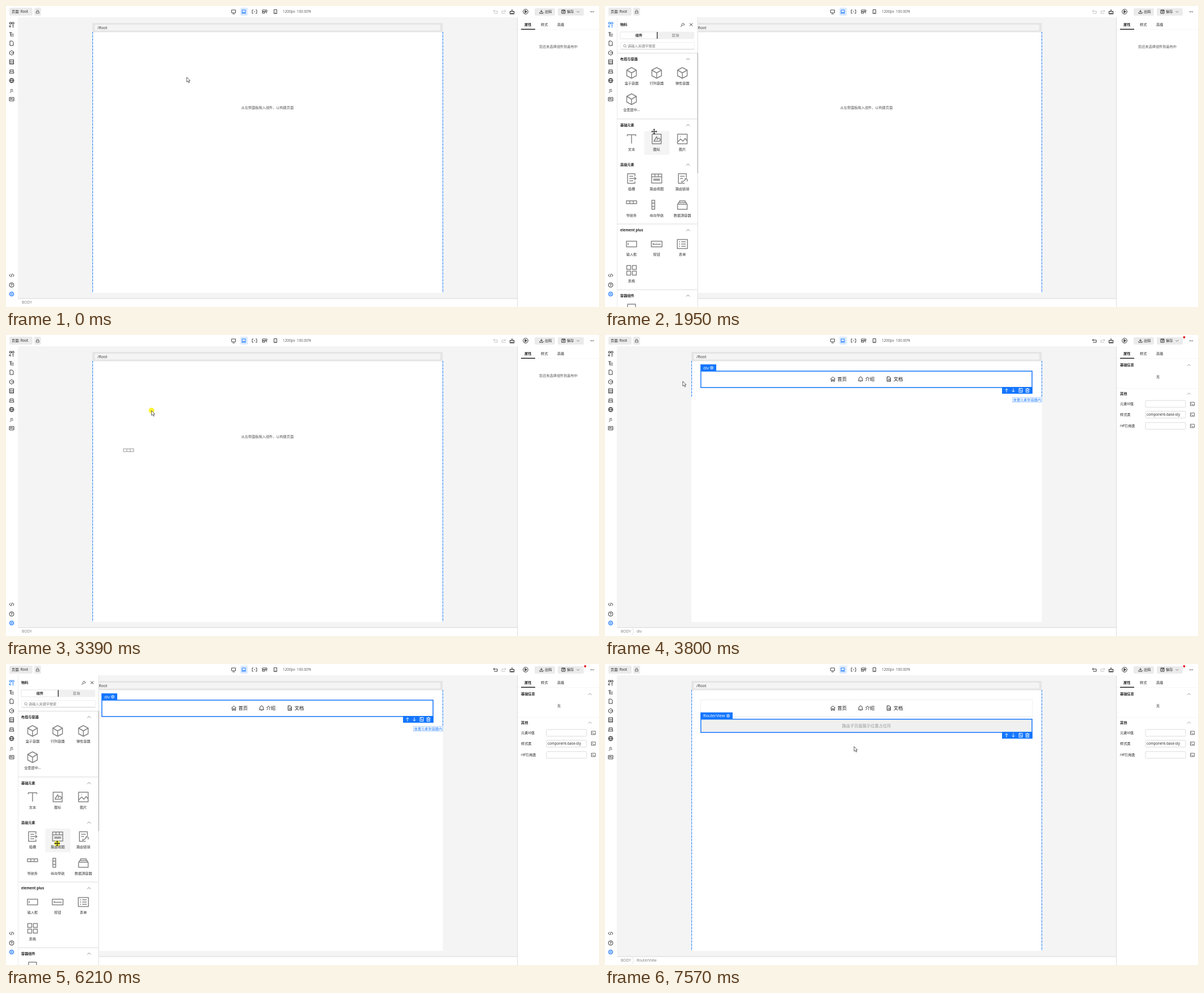
An HTML page that plays this animation: 1050x533 px, repeating every 8 s.

```html
<!DOCTYPE html>
<html lang="zh-CN">
<head>
<meta charset="utf-8">
<title>页面设计器</title>
<style>
  html, body { margin: 0; width: 100%; height: 100%; overflow: hidden; background: #fff; }
  svg { display: block; width: 100%; height: 100%; }
  text { font-family: 'Open Sans', 'Noto Sans CJK SC', 'Noto Sans CJK', sans-serif; white-space: pre; }
</style>
</head>
<body>
<svg id="stage" viewBox="0 0 1050 533"></svg>
<script>
const LOOP = 8000;
const BLUE = '#1476ff', INK = '#222', GREY = '#858585';

// Drawing helpers: each returns SVG markup
const rect = (x, y, w, h, fill, extra = '') =>
  `<rect x="${x}" y="${y}" width="${w}" height="${h}" fill="${fill}" ${extra}/>`;
const text = (x, cy, str, { size = 6.2, fill = INK, weight = 400, anchor = 'start' } = {}) =>
  `<text x="${x}" y="${cy + size * 0.36}" font-size="${size}" fill="${fill}" font-weight="${weight}" text-anchor="${anchor}">${str}</text>`;
const icon = (x, y, d, color = INK, width = 0.9) =>
  `<path transform="translate(${x} ${y})" d="${d}" fill="none" stroke="${color}" stroke-width="${width}" stroke-linejoin="round"/>`;
const group = (id, ...parts) => `<g id="${id}">${parts.join('')}</g>`;
const ring = r => `M${-r} 0a${r} ${r} 0 1 0 ${2 * r} 0a${r} ${r} 0 1 0 ${-2 * r} 0`;
const box = (x, y, w, h) => `M${x} ${y}h${w}v${h}h${-w}z`;

const chevronUp = 'M-3 1.5 0-1.5 3 1.5';
const gear = ring(2.6) + ring(1);

function header() {
  const devices = [
    [403, box(-3.5, -3, 7, 5) + 'M-2 4H2'],
    [421, box(-3, -3, 6, 4.5) + 'M-4 3H4'],
    [440, 'M-2-3H-4V3H-2M2-3H4V3H2M0-1V1'],
    [458, box(-4, -3, 8, 3) + box(-4, 0, 4, 3) + 'M1-2 4 3'],
    [477, box(-2.5, -3.5, 5, 7) + 'M-1 2H1'],
  ];
  return [
    rect(6, 3, 41, 14, '#ebebeb', 'rx="2"'), text(10, 10, '页面: Root'),
    rect(50, 3, 12, 14, '#ebebeb', 'rx="2"'), icon(56, 10, box(-2.5, 0, 5, 3) + 'M-1.5 0V-2L0-3 1.5-2V0', '#555', 0.8),
    rect(415, 3, 13, 14, '#dceaff', 'rx="2"'),
    ...devices.map(([x, d]) => icon(x, 10, d, x === 421 ? BLUE : '#333')),
    text(490, 10, '1200px', { size: 6.4, fill: '#555' }), text(515, 10, '100.00%', { size: 6.4, fill: '#555' }),
    group('undo', icon(867, 10, 'M-2-3-4-1-2 1M-4-1H3V3H-3')),
    icon(881, 10, 'M2-3 4-1 2 1M4-1H-3V3H3', '#bbb'),
    icon(896, 10, box(-3.5, -0.5, 7, 4.5) + 'M0-4V0M-1 2V4M1 2V4', INK, 1.1),
    icon(920, 10, ring(4.3)), icon(920, 10, 'M-1-2 2 0-1 2Z', INK, 1.2),
    rect(936, 4, 36, 13, '#ebebeb', 'rx="2"'), icon(948, 10, 'M0-3V1M-2-1 0 1 2-1M-3 1V3H3V1'), text(954, 10, '出码'),
    rect(977, 4, 46, 13, '#ebebeb', 'rx="2"'), icon(987, 10, box(-3, -3, 6, 6) + 'M-1-3V-1H2V-3M-1 1H1'), text(993, 10, '保存'),
    icon(1013, 10, 'M-2.5-1 0 1.5 2.5-1', '#666', 0.8),
    text(1038, 10, '···', { size: 8, weight: 700, anchor: 'middle' }),
  ].join('');
}

function sidebar() {
  const shapes = [
    [50, 'M-4-3H1M-2-3V3H4M-2 0H4'],
    [66, 'M-3-4H1L3-2V4H-3Z'],
    [83, 'M0-4 3.5-2V2L0 4-3.5 2V-2ZM-1 0H4'],
    [99, box(-3.5, -4, 7, 8) + 'M-3.5-1H3.5M-3.5 2H3.5'],
    [116, 'M-3-3H3V0H-3ZM-4 3H4M-3 0-4 3M3 0 4 3'],
    [132, ring(4) + 'M-4 0H4M0-4Q-4 0 0 4Q4 0 0-4'],
    [165, box(-4, -3, 8, 6) + 'M-2 1V-1H0V1M1-1 3 1'],
    [477, 'M-2-2.5-4 0-2 2.5M2-2.5 4 0 2 2.5M1-3-1 3'],
    [494, ring(4) + 'M-1.5-1Q0-3 1.5-1L0 .5V2'],
  ];
  return shapes.map(([y, d]) => icon(10, y, d)).join('') +
    `<g id="materials">${icon(10, 33, box(-3.5, -4, 3, 3) + box(1, -4, 3, 3) + 'M-1 2H-4V4H-1M1 1.5H4M1 4H4', 'currentColor')}</g>` +
    text(10, 149, 'JS', { size: 7, anchor: 'middle' }) +
    icon(10, 510, ring(3.4), '#4a94ff', 1.8) + icon(10, 510, ring(1), BLUE, 1);
}

function workspace() {
  return rect(21, 20, 884, 498, '#f4f4f4') + rect(153, 30, 620.5, 478, '#fff') +
    rect(153, 30, 620.5, 16.5, '#e5e5e5') + rect(157, 33, 612, 10.5, '#f4f4f4', 'rx="3"') +
    text(162, 38.5, '/Root', { size: 6.8, fill: '#333' }) +
    rect(21, 517.5, 884, 1.2, '#dedede') + rect(905, 20, 1, 513, '#dcdcdc') +
    text(28, 525, 'BODY', { fill: '#777', size: 6.6 });
}

const dashes = (id, bottom) =>
  `<path id="${id}" d="M153.5 46V${bottom}M773.5 46V${bottom}" stroke="${BLUE}" stroke-width="1.1" stroke-dasharray="3 1 1 1"/>`;

const crumb = (id, name) =>
  group(id, icon(50, 525, 'M-2-6 1 0-2 6', '#ddd'), text(56, 525, name, { fill: '#777', size: 6.6 }));

function selection(id, name, top, height, labelWidth, inner = '') {
  const bottom = top + height;
  return group(id, inner,
    `<rect x="169.7" y="${top}" width="586.4" height="${height}" fill="none" stroke="${BLUE}" stroke-width="1.5"/>`,
    rect(169, top - 12, labelWidth, 12, BLUE),
    text(174, top - 6, name, { size: 7.2, fill: '#fff' }), icon(169 + labelWidth - 8, top - 6, gear, '#fff', 0.8),
    rect(703, bottom - 1, 54, 12, BLUE),
    icon(711, bottom + 5, 'M0 3.5V-3M-2.5-.5 0-3 2.5-.5', '#fff'),
    icon(723, bottom + 5, 'M0-3.5V3M-2.5 .5 0 3 2.5 .5', '#fff'),
    icon(736, bottom + 5, box(-3, -3.5, 6, 7) + 'M-1-3V1H3', '#fff'),
    icon(748, bottom + 5, 'M-3.5-2.5H3.5M-1-3.5H1M-2.5-2.5V3.5H2.5V-2.5M-.8-1V2M.8-1V2', '#fff'));
}

function navBar() {
  const label = (x, str) => text(x, 78, str, { size: 8.2, fill: '#111' });
  return group('navBar',
    `<rect x="169.5" y="63.5" width="587.5" height="30" fill="#fff" stroke="#eee"/>`,
    icon(403.5, 78, 'M-4 0 0-4 4 0M-3-1V4H-1V1H1V4H3V-1'), label(411.5, '首页'),
    icon(452.5, 78, 'M-3 2V-1Q-2-4 0-4T3-1V2L4 3H-4ZM-1 4H1'), label(460.8, '介绍'),
    icon(502.5, 78, 'M-3-4H1L3-2V4H-3ZM-1 0H2M-1 2H2', INK, 1), label(511, '文档'));
}

function inspector() {
  const tabs = [[918, '属性', 600], [947, '样式', 400], [976, '高级', 400]];
  const fields = [[122, '元素id值', ''], [141, '样式类', 'component-base-sty'], [161, 'ref引用类', '']];
  return tabs.map(([x, s, weight]) => text(x, 33, s, { weight })).join('') +
    rect(906, 41.5, 144, 0.6, '#eee') + rect(912, 40.5, 25, 1.5, INK) +
    group('noSelection', text(978, 72, '您还未选择组件到画布中', { anchor: 'middle', fill: '#555' })) +
    group('properties',
      text(912, 53, '基础信息', { weight: 600 }), icon(1034, 53.5, chevronUp, '#888', 0.8),
      text(979, 74, '无', { anchor: 'middle' }),
      rect(906, 94, 144, 0.6, '#eee'),
      text(912, 104, '其他', { weight: 600 }), icon(1034, 104, chevronUp, '#888', 0.8),
      ...fields.map(([y, label, value]) => text(912, y, label) +
        rect(957, y - 6, 71, 12, '#fff', 'rx="1.5" stroke="#d2d2d2" stroke-width=".8"') + text(959, y, value) +
        icon(1040, y, box(-3.5, -3, 7, 6) + 'M-2-1.5-.5 0-2 1.5M0 1.5H2', '#444', 0.8)),
      `<circle cx="1025.5" cy="4" r="2" fill="#e02020"/>`);
}

const shape = {
  cube: 'M0-9.5 8.5-5V5L0 9.5-8.5 5V-5ZM-8.5-5 0 0 8.5-5M0 0V9.5',
  type: 'M-7.5-5V-7.5H7.5V-5M0-7.5V8',
  glyph: box(-8, -8.5, 16, 17) + 'M-5 4 0-4 2 0M-5 4H3M1 2a2.7 2.7 0 1 1 2 2',
  image: box(-8.5, -8.5, 17, 17) + 'M-8 5-3 0 1 4 5-1 8 3M-4-4h1',
  slot: 'M6-4V-8.5H-7V8.5H6V5M-4-4H3M-4 0H8M-4 4H3M5-2.5 8 0 5 2.5',
  view: box(-9, -8, 18, 16) + 'M-9-3H9M-3-8V-3M3-8V-3M-6 1H6M-6 3H6',
  link: 'M7-1V-8.5H-7V8.5H-1M-4-4H4M-4 0H1M1 6 6 1M0 4a2.5 2.5 0 1 0 4 4M4 1a2.5 2.5 0 1 1 4 4',
  nav: box(-9, -7, 18, 5) + 'M-3-7V-2M3-7V-2',
  column: box(-8.5, -8, 5, 16) + 'M-8.5-3H-3.5M-8.5 3H-3.5',
  trays: box(-8.5, -1, 17, 9) + 'M-7-1V-4H7V-1M-5-4V-7H5V-4',
  input: box(-9, -5, 18, 10) + 'M-6-2V2',
  button: box(-9.5, -5, 19, 10),
  form: box(-9, -8, 18, 16) + 'M-6-4H-4M-2-4H6M-6 0H-4M-2 0H6M-6 4H-4M-2 4H6',
  table: box(-8.5, -8.5, 7, 7) + box(1.5, -8.5, 7, 7) + box(-8.5, 1.5, 7, 7) + box(1.5, 1.5, 7, 7),
  tray: box(-7, -9.5, 14, 18),
};

const sections = [
  [94, '布局与容器', [['cube', '盒子容器'], ['cube', '行列容器'], ['cube', '弹性容器'], ['cube', '全宽居中...']]],
  [211, '基础元素', [['type', '文本'], ['glyph', '图标'], ['image', '图片']]],
  [281, '高级元素', [['slot', '插槽'], ['view', '路由视图'], ['link', '路由链接'],
    ['nav', '导航条'], ['column', '纵向导航'], ['trays', '数据源容器']]],
  [397, 'element plus', [['input', '输入框'], ['button', '按钮'], ['form', '表单'], ['table', '表格']]],
  [513, '容器组件', [['tray', '']]],
];
const items = sections.flatMap(([y, , list]) => list.map(([kind, label], i) =>
  ({ kind, label, x: [47, 91.5, 137][i % 3], y: y + 24.5 + 46.5 * Math.floor(i / 3) })));

function panel() {
  return group('panel',
    rect(21, 20, 144, 513, '#fff'), rect(21, 20, 0.8, 513, '#e6e6e6'),
    rect(163, 20, 2, 513, '#ededed'), rect(163.5, 83, 1.5, 213, '#c0c0c0'),
    text(27, 33, '物料', { weight: 600 }),
    icon(138, 33, 'M0-3 3 0 1 .5-.5 2-2.5 0-1-1.5ZM-1.5 1-4 4', '#333', 0.8),
    icon(152.5, 33, 'M-2.5-2.5 2.5 2.5M2.5-2.5-2.5 2.5'),
    rect(27, 45.5, 131, 13, '#f0f0f0', 'rx="1.5"'), rect(27, 46, 65, 12, '#fff', 'stroke="#ddd" stroke-width=".7"'),
    rect(91.8, 46, 1.4, 12, '#333'),
    text(60, 52, '组件', { anchor: 'middle', weight: 600 }), text(125, 52, '区块', { anchor: 'middle', fill: '#666' }),
    rect(27.5, 64.5, 131, 12, '#fff', 'rx="1.5" stroke="#eee" stroke-width=".8"'), rect(28, 76, 130, 1, '#d0d0d0'),
    icon(35, 70.5, ring(2.2) + 'M1.5 1.5 3 3', '#777', 0.7), text(40, 70.5, '请输入关键字搜索', { fill: '#777' }),
    ...[83, 199.5, 385.5, 502].map(y => rect(21, y, 142, 1, '#dcdcdc')),
    rect(-22, -14, 44.5, 42, '#f4f4f4', 'id="hover"'),
    ...sections.map(([y, title]) => text(27, y, title, { weight: 700 }) + icon(147, y, chevronUp, '#666', 0.8)),
    ...items.map(({ kind, label, x, y }) => icon(x, y, shape[kind], GREY, 1.5) +
      (kind === 'button' ? text(x, y, 'Button', { size: 4.2, weight: 700, fill: '#555', anchor: 'middle' }) : '') +
      text(x, y + 18.5, label, { anchor: 'middle', fill: '#333' })));
}

function cursor() {
  return group('cursor',
    `<circle id="press" r="5" fill="#fbf236"/>`,
    `<path id="arrow" d="M0 0V8.5L2 6.8 3.6 10 4.9 9.3 3.5 6.2H6Z" fill="#fff" stroke="#222" stroke-width=".7"/>`,
    `<path id="hand" d="M1 0Q2 0 2 1V4L6 5Q7 6 6 10H2L-1 6 1 6V1Z" fill="#fff" stroke="#111" stroke-width=".8"/>`,
    `<path id="move" d="M0-5 2-3H.6V-.6H3V-2L5 0 3 2V.6H.6V3H2L0 5-2 3H-.6V.6H-3V2L-5 0-3-2V-.6H-.6V-3H-2Z" fill="#222"/>`,
    `<g id="forbidden">${icon(0, 0, ring(3.6) + 'M-2.5-2.5 2.5 2.5', '#333', 0.8)}</g>`);
}

document.getElementById('stage').innerHTML = [
  rect(0, 0, 1050, 533, '#fff'), header(), sidebar(), workspace(), dashes('fullOutline', 508), dashes('shortOutline', 109),
  group('hint', text(463, 180, '从左侧面板拖入组件，以构建页面', { anchor: 'middle', fill: '#555' })),
  navBar(), selection('navSelected', 'div', 64, 29, 28),
  group('dropLabel', rect(721.5, 110.5, 52, 8.5, '#fff', 'stroke="#9cc5ff" stroke-width=".8"'),
    text(747.5, 114.7, '放置元素到容器内', { anchor: 'middle', fill: BLUE })),
  selection('viewSelected', 'RouterView', 97.7, 23.5, 57, rect(169, 97, 587, 24, '#f0f0f0') +
    text(463, 109.5, '路由子页面展示位置占位符', { size: 7.25, anchor: 'middle', fill: '#999' })),
  crumb('navCrumb', 'div'), crumb('viewCrumb', 'RouterView'),
  inspector(), panel(),
  group('ghost', rect(-22, -14, 44, 21, '#fff', 'opacity=".7"'),
    ...['nav', 'view'].map(kind => `<g id="${kind}Ghost" opacity=".6">${icon(0, 0, shape[kind], GREY, 1.5)}</g>`)),
  cursor(),
].join('');

// Pointer path: time, x, y
const path = [
  [0, 320, 126], [70, 322, 126], [140, 323, 126], [600, 323, 126], [850, 190, 85], [1200, 13, 35], [1470, 13, 35],
  [1950, 87, 222], [2240, 91, 292], [2310, 88, 298], [2600, 47, 350], [2720, 47, 350], [2860, 92, 340],
  [3060, 172, 274], [3130, 190, 245], [3400, 260, 130], [3660, 260, 130], [3800, 138, 82], [4420, 14, 37],
  [4690, 14, 37], [5100, 62, 240], [5380, 80, 364], [5520, 80, 364], [5850, 82, 340], [6130, 90, 318],
  [6210, 90, 318], [6420, 215, 240], [6690, 367, 154], [7290, 367, 154], [7570, 441, 146], [LOOP, 441, 146],
];
function pointerAt(t) {
  const i = Math.max(1, path.findIndex(([time]) => time > t));
  const [t0, x0, y0] = path[i - 1], [t1, x1, y1] = path[i];
  const k = (t - t0) / (t1 - t0);
  return [x0 + (x1 - x0) * k, y0 + (y1 - y0) * k];
}

const parts = Object.fromEntries([...document.querySelectorAll('[id]')].map(el => [el.id, el]));
const show = (id, on) => parts[id].style.display = on ? '' : 'none';
const place = (id, x, y) => parts[id].setAttribute('transform', `translate(${x} ${y})`);
const itemAt = ([x, y]) => items.find(it => Math.abs(x - it.x) < 22 && y >= it.y - 14 && y < it.y + 28);

function render(t) {
  const within = (a, b) => t >= a && t < b;
  const open = within(1330, 3200) || within(4620, 6420);
  const hasNav = t >= 3400, hasView = t >= 6900;
  const dragging = within(2720, 3400) || within(6250, 6900);

  show('panel', open);
  parts.materials.style.color = open ? BLUE : INK;
  parts.undo.style.opacity = hasNav ? 1 : 0.3;
  show('hint', !hasNav);
  show('noSelection', !hasNav);
  show('properties', hasNav);
  show('navBar', hasNav);
  show('navSelected', hasNav && !hasView);
  show('navCrumb', hasNav && !hasView);
  show('viewSelected', hasView);
  show('viewCrumb', hasView);
  show('fullOutline', t < 2700 || within(3270, 3730) || t >= 6420);
  show('shortOutline', within(3730, 6420));
  show('dropLabel', within(3730, 6420));

  // The highlighted item stays put while something is dragged
  const hoverTime = within(2850, 3400) ? 2850 : within(6210, 6900) ? 6210 : t;
  const item = itemAt(pointerAt(hoverTime));
  show('hover', item);
  if (item) place('hover', item.x, item.y);

  const [x, y] = pointerAt(t);
  const kind = dragging ? (open ? 'forbidden' : 'arrow')
    : open && itemAt([x, y]) ? 'move' : x < 21 ? 'hand' : 'arrow';
  for (const id of ['arrow', 'hand', 'move', 'forbidden']) show(id, id === kind);
  show('press', within(2650, 3400) || within(6140, 6900));
  place('cursor', x, y);

  const [gx, gy] = pointerAt(t - 180);
  show('ghost', dragging);
  show('navGhost', !hasNav);
  show('viewGhost', hasNav);
  place('ghost', gx + 6, gy - 2);
}

function tick() {
  render(performance.now() % LOOP);
  requestAnimationFrame(tick);
}
tick();
</script>
</body>
</html>
```
